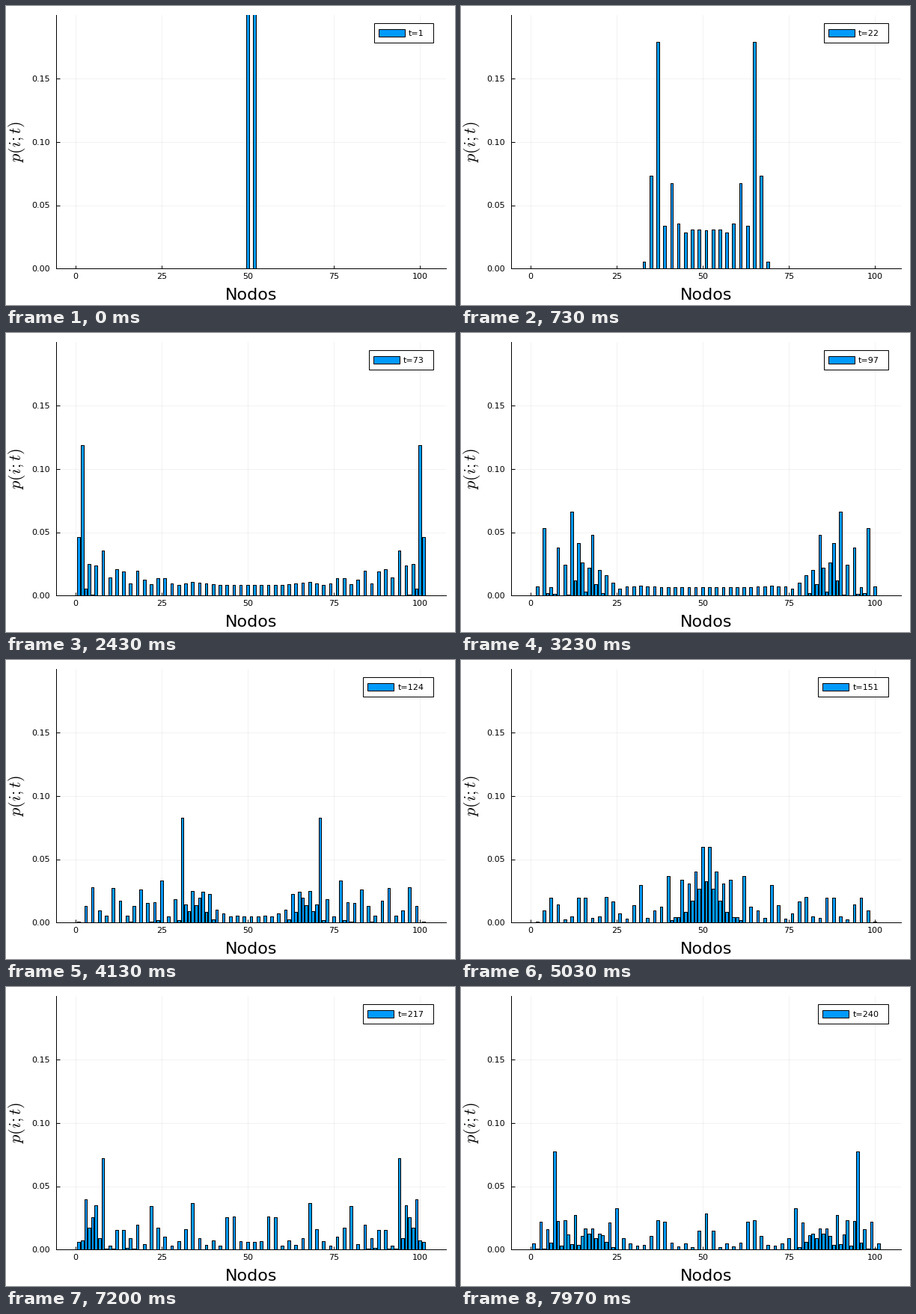
Animation, 600 px wide and 400 px high, one loop 8000 ms. Source, as a matplotlib script:

```python
import numpy as np
import matplotlib.pyplot as plt
from matplotlib.animation import FuncAnimation
from matplotlib.collections import PolyCollection
from matplotlib.patches import Rectangle

W, H, DPI = 600, 400, 100
NODES, STEPS, LOOP_MS = 101, 240, 8000
PX = 72 / DPI  # one pixel in points
BLUE = "#009afa"

plt.rcParams.update({"font.family": "DejaVu Sans", "mathtext.fontset": "cm"})


def walk(nodes, steps):
    """Hadamard walk on a ring with flip-flop shift; neighbours are sorted by
    index, so the coin is reversed on the first and last node."""
    sign = np.ones(nodes)
    sign[[0, -1]] = -1
    left = np.zeros(nodes, complex)
    right = np.zeros(nodes, complex)
    left[nodes // 2] = 1 / np.sqrt(2)
    right[nodes // 2] = 1j / np.sqrt(2)
    probs = []
    for _ in range(steps):
        to_left = (sign * left + right) / np.sqrt(2)
        to_right = (left - sign * right) / np.sqrt(2)
        left, right = np.roll(to_right, 1), np.roll(to_left, -1)
        probs.append(abs(left) ** 2 + abs(right) ** 2)
    return np.array(probs)


prob = walk(NODES, STEPS)
node = np.arange(1, NODES + 1)

fig = plt.figure(figsize=(W / DPI, H / DPI), dpi=DPI, facecolor="white")

# Plot area
x0, x1, y0, y1 = 66.7, 588.2, 48.6, 388.2
ax = fig.add_axes([x0 / W, y0 / H, (x1 - x0) / W, (y1 - y0) / H])
ax.set_xlim(51 - 56.63, 51 + 56.63)
ax.set_ylim(0, 0.2)
ax.set_xticks(range(0, 101, 25))
ax.set_yticks([0, 0.05, 0.1, 0.15], ["0.00", "0.05", "0.10", "0.15"])
ax.tick_params(direction="in", length=4.5 * PX, width=PX, labelsize=8)
ax.tick_params(axis="x", pad=6 * PX)
ax.tick_params(axis="y", pad=8 * PX)
ax.grid(color="black", alpha=0.1, linewidth=0.5 * PX)
ax.set_axisbelow(True)
for side in ("top", "right"):
    ax.spines[side].set_visible(False)
for side in ("left", "bottom"):
    ax.spines[side].set_linewidth(PX)

bars = PolyCollection([], facecolor=BLUE, edgecolor="black", linewidth=PX, zorder=2)
ax.add_collection(bars, autolim=False)

# Labels and legend in pixel coordinates, y downwards
page = fig.add_axes([0, 0, 1, 1])
page.set_xlim(0, W)
page.set_ylim(H, 0)
page.axis("off")
page.text(327.4, 393, "Nodos", fontsize=16, ha="center", va="baseline")
page.text(14.5, 182, "$p(i;t)$", fontsize=16, rotation=90, ha="center", va="center")

box = Rectangle((0, 23), 1, 26, facecolor="white", edgecolor="black", linewidth=PX)
key = Rectangle((0, 31), 35, 10, facecolor=BLUE, edgecolor="black", linewidth=PX)
page.add_patch(box)
page.add_patch(key)
tag = page.text(0, 40.5, "", fontsize=8, va="baseline")


def draw(i):
    p = prob[i]
    lo, hi, zero = node - 0.4, node + 0.4, np.zeros(NODES)
    xs = np.stack([lo, lo, hi, hi], axis=1)
    ys = np.stack([zero, p, p, zero], axis=1)
    bars.set_verts(np.stack([xs, ys], axis=2))

    label = f"t={i + 1}"
    left = 492 - 7.3 * (len(label) - 3)
    box.set_x(left)
    box.set_width(571 - left)
    key.set_x(left + 6)
    tag.set_x(left + 46)
    tag.set_text(label)
    return bars, box, key, tag


anim = FuncAnimation(fig, draw, frames=STEPS, interval=LOOP_MS / STEPS,
                     repeat=True, repeat_delay=0)
plt.show()
```
